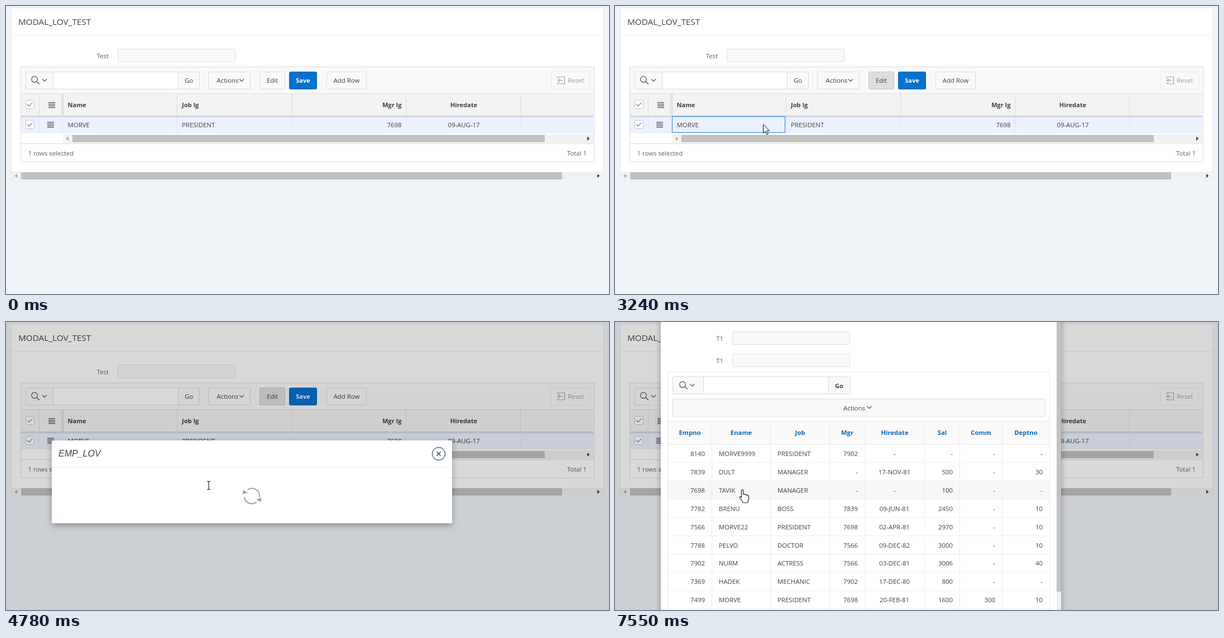
Recreate the animation shown at these times as an HTML page. Size 1080 by 518 pixels, loop 8000 ms.

```html
<!DOCTYPE html>
<html lang="en">
<head>
<meta charset="utf-8">
<title>Modal list of values</title>
<style>
  html, body { margin: 0; width: 100%; height: 100%; overflow: hidden; background: #eff4f9; }
  svg { display: block; width: 100vw; height: 100vh; }
  text { font: 11.4px "Open Sans", "Noto Sans", sans-serif; fill: #404040; white-space: pre; }
  .title { font-size: 15.3px; }
  .soft { fill: #5c5c5c; }
  .head { font-weight: 700; font-size: 11.1px; }
  .link { font-weight: 700; font-size: 11.3px; fill: #0b67bd; }
  .modal { font: italic 16px "Liberation Sans", Arial, sans-serif; }
</style>
</head>
<body>
<svg id="stage" viewBox="0 0 1080 518" preserveAspectRatio="none"></svg>
<script>
const LOOP = 8000;
const stage = document.getElementById('stage');

// Drawing helpers returning SVG markup
const rect = (x, y, w, h, fill, more = '') =>
  `<rect x="${x}" y="${y}" width="${w}" height="${h}" fill="${fill}" ${more}/>`;
const box = (x, y, w, h, fill, stroke, more = '') =>
  rect(x + .5, y + .5, w, h, fill, `stroke="${stroke}" ${more}`);
const path = (d, stroke, width = 1, fill = 'none') =>
  `<path d="${d}" fill="${fill}" stroke="${stroke}" stroke-width="${width}"/>`;
const vline = (x, y1, y2, color) => path(`M${x + .5} ${y1}V${y2}`, color);
const hline = (y, x1, x2, color) => path(`M${x1} ${y + .5}H${x2}`, color);
const text = (s, x, y, anchor = 'start', cls = '', more = '') =>
  `<text x="${x}" y="${y}" text-anchor="${anchor}" class="${cls}" ${more}>${s}</text>`;
const group = (id, body, hidden = true) =>
  `<g id="${id}"${hidden ? ' display="none"' : ''}>${body}</g>`;

const button = (x, w, label, fill = '#f9f9f9', stroke = '#dadada', more = '') =>
  box(x, 118, w, 31, fill, stroke, 'rx="2"') + text(label, x + w / 2 + .5, 138, 'middle', '', more);
const chevron = (x, y) => path(`M${x - 4} ${y - 2}l4 4 4-4`, '#505050', 1.2);
const magnifier = (x, y) =>
  `<circle cx="${x}" cy="${y}" r="5.3" fill="none" stroke="#505050" stroke-width="1.2"/>` +
  path(`M${x + 4} ${y + 4}l5 4.6`, '#505050', 1.3);
const checkbox = y =>
  box(35, y, 15, 15, '#fff', '#c4c4c4', 'rx="2"') + path(`M38.5 ${y + 8}l3 3 6-6.5`, '#666', 1.1);
const menuIcon = (x, y) => [0, 3, 6, 9].map(d => rect(x, y + d, 12, 1.2, '#404040')).join('');
const scrollbar = (x1, x2, y, thumbX, thumbEnd, id) =>
  rect(x1, y, x2 - x1, 15, '#f1f1f1') +
  rect(thumbX, y + 1, thumbEnd - thumbX, 13, '#c1c1c1', `id="${id}"`) +
  path(`M${x1 + 10} ${y + 4}v7l-4.5-3.5z`, 'none', 0, '#a3a3a3') +
  path(`M${x2 - 11} ${y + 4}v7l4.5-3.5z`, 'none', 0, '#404040');

function page() {
  const separators = [354, 446, 565].map(x => vline(x, 118, 150, '#f0f0f0')).join('');
  const columns = [59, 306, 511, 716, 921];
  return rect(0, 0, 1080, 518, '#eff4f9') +
    box(9, 3, 1061, 311, '#fff', '#e3e7ea', 'rx="2"') +
    hline(52, 10, 1070, '#ebebeb') +
    text('MODAL_LOV_TEST', 22, 34, 'start', 'title') +
    text('Test', 184, 93.5, 'end', 'soft') +
    box(200, 77, 210, 23, '#f9f9f9', '#dfdfdf', 'rx="2"') +
    scrollbar(10, 1070, 298, 27, 996, 'pageThumb') +

    box(26, 109, 1027, 171, '#fff', '#dcdcdc') +
    rect(27, 110, 1026, 47, '#f9f9f9') + separators +
    box(84, 118, 224, 31, '#fff', '#dadada') +
    button(35, 49, '') + magnifier(51, 132) + chevron(69, 133.5) +
    button(308, 38, 'Go') +
    button(362, 75, 'Actions  ') + chevron(422, 133.5) +
    button(454, 45, 'Edit') +
    group('pressed', button(454, 45, 'Edit', '#dedede', '#c4c4c4')) +
    button(507, 49, 'Save', '#0572ce', '#0567ba', 'style="fill:#fff;font-weight:700;font-size:11px"') +
    button(574, 71, 'Add Row') +
    `<g opacity=".5">${button(976, 69, '')}${text('Reset', 1006, 138)}
      ${path('M988 130.5V127.5H1000.500V140H988V137M997 133.700H989M992 130.500l-3.500 3.200 3.500 3.200', '#505050', 1.2)}</g>` +

    rect(27, 157, 1025, 41, '#f3f3f3') + hline(157, 27, 1053, '#dcdcdc') +
    rect(27, 198, 1025, 31, '#ebf1fd') + rect(27, 197, 1025, 5, 'url(#fall)') +
    columns.map(x => vline(x, 158, 197, '#dcdcdc') + vline(x, 198, 229, '#e0e7f2')).join('') +
    rect(99, 158, 1, 40, '#d2d2d2') + rect(101.5, 158, 1.5, 40, '#d2d2d2') +
    vline(100, 198, 229, '#dae2ef') +
    checkbox(169) + checkbox(205) + menuIcon(76, 173) + menuIcon(74, 208.500) +
    text('Name', 110.500, 182, 'start', 'head') + text('Job Ig', 315, 182, 'start', 'head') +
    text('Mgr Ig', 708.500, 182, 'end', 'head') + text('Hiredate', 820, 182, 'middle', 'head') +
    text('MORVE', 110.500, 218) + text('PRESIDENT', 315, 218) +
    text('7698', 708.500, 218, 'end') + text('09-AUG-17', 820, 218, 'middle') +
    scrollbar(102, 1052, 231, 119, 965, 'gridThumb') +
    hline(247, 27, 1053, '#dcdcdc') +
    text('1 rows selected', 39.500, 269, 'start', 'soft') + text('Total 1', 1040, 269, 'end', 'soft') +
    group('focus', box(102, 198, 202, 29, 'none', '#2a7bd0'));
}

function smallDialog() {
  const arrowArc = 'M-13.500 2A13.500 13.500 0 0 0 8 11M-8 -11A13.500 13.500 0 0 1 13.500 2';
  const arrowHeads = 'M-17 -3l1.500 -8 8 5zM17 3l-1.500 8 -8-5z';
  return rect(82, 213, 717, 149, '#fff', 'filter="url(#shade)"') +
    hline(261, 82, 799, '#ededed') +
    text('EMP_LOV', 94, 242, 'start', 'modal') +
    '<circle cx="775" cy="237" r="12" fill="none" stroke="#b9d5ef" stroke-width="2"/>' +
    '<circle cx="775" cy="237" r="11.300" fill="#fff" stroke="#34495c"/>' +
    path('M771.500 233.500l7 7m0-7l-7 7', '#404040', 1.5) +
    group('spinner', path(arrowArc, '#a3a3a3', 2.2) + path(arrowHeads, 'none', 0, '#a3a3a3'));
}

const ROW_TOP = 220, ROW_H = 32.9;
const edges = [94, 173, 278, 384, 447, 554, 617, 693, 778];
const heads = ['Empno', 'Ename', 'Job', 'Mgr', 'Hiredate', 'Sal', 'Comm', 'Deptno'];
const aligns = ['end', 'start', 'start', 'end', 'middle', 'end', 'end', 'end'];
const rows = `8140 MORVE9999 PRESIDENT 7902 - - - -
7839 DULT MANAGER - 17-NOV-81 500 - 30
7698 TAVIK MANAGER - - 100 - -
7782 BRENU BOSS 7839 09-JUN-81 2450 - 10
7566 MORVE22 PRESIDENT 7698 02-APR-81 2970 - 10
7788 PELVO DOCTOR 7566 09-DEC-82 3000 - 10
7902 NURM ACTRESS 7566 03-DEC-81 3006 - 40
7369 HADEK MECHANIC 7902 17-DEC-80 800 - -
7499 MORVE PRESIDENT 7698 20-FEB-81 1600 300 10`.split('\n').map(r => r.split(' '));

function report() {
  const cellX = i => ({ start: edges[i] + 13, end: edges[i + 1] - 12, middle: (edges[i] + edges[i + 1]) / 2 })[aligns[i]];
  const field = y => text('T1', 194, y + 17, 'end', 'soft') + box(210, y, 210, 23, '#f9f9f9', '#dfdfdf', 'rx="2"');
  const body = rows.map((row, r) =>
    hline(Math.round(ROW_TOP + (r + 1) * ROW_H - .5), 95, 778, '#efefef') +
    row.map((s, i) => text(s, cellX(i), 241 + r * ROW_H, aligns[i])).join('')).join('');
  return field(17) + field(57) +
    box(94, 89, 684, 440, 'none', '#e8e8e8') +
    box(103, 98, 318, 31, '#f9f9f9', '#dadada', 'rx="2"') +
    box(158, 98, 224, 31, '#fff', '#dadada') + magnifier(121, 112.500) + chevron(138.500, 113.500) +
    text('Go', 401.500, 118.500, 'middle', 'head') +
    box(103, 138, 667, 31, '#f9f9f9', '#dadada', 'rx="2"') +
    text('Actions', 409, 158.500) + chevron(455.500, 153.500) +
    rect(95, 178, 683, 42, '#fafafa') +
    hline(178, 95, 778, '#e8e8e8') + hline(220, 95, 778, '#e8e8e8') +
    rect(95, 0, 683, ROW_H, '#f7f7f7', 'id="hover"') +
    edges.slice(1, -1).map(x => vline(x, 179, 518, '#ececec')).join('') +
    heads.map((s, i) => text(s, (edges[i] + edges[i + 1]) / 2 + .5, 203, 'middle', 'link')).join('') +
    body + rect(791, 0, 8, 518, '#f1f1f1') + rect(791, 0, 8, 485, '#c1c1c1');
}

stage.innerHTML = `<defs>
  <linearGradient id="fall" x2="0" y2="1"><stop stop-color="#c5cddd"/><stop offset="1" stop-color="#ebf1fd"/></linearGradient>
  <filter id="shade" x="-10%" y="-20%" width="120%" height="150%">
    <feDropShadow dx="0" dy="4" stdDeviation="6" flood-opacity=".32"/></filter></defs>` +
  page() +
  group('overlay', rect(0, 0, 1080, 518, '#000', 'opacity=".15"')) +
  group('dialog', smallDialog()) +
  group('panel', rect(82, -20, 717, 560, '#fff', 'filter="url(#shade)"') + group('report', report())) +
  group('cursor',
    group('arrow', path('M.5 .5V16.200L4.200 12.800 6.700 18.600 9.200 17.500 6.700 11.800H11.500Z', '#111', 1, '#fff')) +
    group('beam', path('M-3 -7.500H-1L0 -6.500 1 -7.500H3M0 -6.500V6.500M-3 7.500H-1L0 6.500 1 7.500H3', '#222', 1.2)) +
    group('hand', path('M-1.500 1.500C-1.500 -.7 1.800 -.7 1.800 1.500V8.500C2 7 5 7 5 9C5.500 7.800 8.300 8 8.300 10C9 9 11.500 9.300 11.500 11.500V16C11.500 19 9.500 20 9.500 23H1C1 20 -1 19 -4 15C-6 12.500 -3 11 -1.500 13.500Z', '#222', 1.2, '#fff')));

const el = Object.fromEntries([...stage.querySelectorAll('[id]')].map(e => [e.id, e]));
const show = (id, on) => el[id].setAttribute('display', on ? 'inline' : 'none');

// The screen refreshes in bursts: [first, last, count]
const bursts = [[300, 1070, 11], [1150, 1530, 6], [1760, 1760, 1], [2080, 2390, 5], [2620, 2620, 1],
  [2770, 2850, 2], [3170, 3400, 4], [3550, 3940, 6], [4090, 4860, 11], [4930, 5010, 2],
  [5170, 5940, 11], [6010, 6700, 10], [6860, 7550, 10]];

function refreshTime(t) {
  const burst = bursts.filter(b => b[0] <= t).pop();
  if (!burst) return 0;
  const [first, last, count] = burst;
  if (t >= last) return last;
  const step = (last - first) / (count - 1);
  return first + Math.floor((t - first) / step + .1) * step;
}

// Pointer tip: [time, x, y]
const track = [[300, 1012, 499], [450, 985, 412], [600, 908, 372], [750, 780, 347], [900, 570, 322],
  [1070, 424, 271], [1530, 256, 218], [2000, 256, 218], [2080, 277, 217], [2310, 256, 216], [2390, 249, 215],
  [2620, 247, 214], [3100, 247, 214], [3400, 284, 211], [3500, 284, 211], [3940, 361, 293],
  [4250, 361, 293], [4330, 363, 294], [5090, 363, 294], [5400, 300, 238], [5940, 351, 414],
  [6200, 342, 462], [6700, 330, 272], [6780, 330, 272], [7080, 405, 238], [7550, 228, 302]];

function pointer(t) {
  const i = track.findIndex(k => k[0] >= t);
  if (i < 0) return track[track.length - 1].slice(1);
  if (i === 0) return track[0].slice(1);
  const [t0, x0, y0] = track[i - 1], [t1, x1, y1] = track[i];
  const k = (t - t0) / (t1 - t0);
  return [x0 + (x1 - x0) * k, y0 + (y1 - y0) * k];
}

function draw(now) {
  const t = refreshTime(now % LOOP);
  const [x, y] = pointer(t);
  const shape = t < 4300 ? 'arrow' : t < 4850 ? 'beam' : t < 5000 ? 'arrow' : 'hand';

  show('cursor', t >= 300);
  el.cursor.setAttribute('transform', `translate(${x} ${y})`);
  for (const id of ['arrow', 'beam', 'hand']) show(id, id === shape);

  show('focus', t >= 1760 && t < 3550);
  show('pressed', t >= 2770);
  el.gridThumb.setAttribute('fill', t < 2000 && y > 231 && y < 246 ? '#a8a8a8' : '#c1c1c1');

  show('overlay', t >= 4090);
  show('dialog', t >= 4090 && t < 4850);
  const open = Math.min(1, Math.max(0, (t - 4060) / 300));
  el.dialog.setAttribute('opacity', open);
  el.dialog.setAttribute('transform', `translate(440.5 362) scale(${.742 + .258 * open}) translate(-440.5 -362)`);
  show('spinner', t >= 4300);
  el.spinner.setAttribute('transform', `translate(440.5 313) rotate(${(t - 4783) * .18})`);

  show('panel', t >= 4850);
  show('report', t >= 4930);
  const row = Math.floor((y - ROW_TOP) / ROW_H);
  show('hover', t >= 5000);
  el.hover.setAttribute('y', ROW_TOP + row * ROW_H);
}

const start = performance.now();
function tick() {
  draw(performance.now() - start);
  requestAnimationFrame(tick);
}
tick();
</script>
</body>
</html>
```
